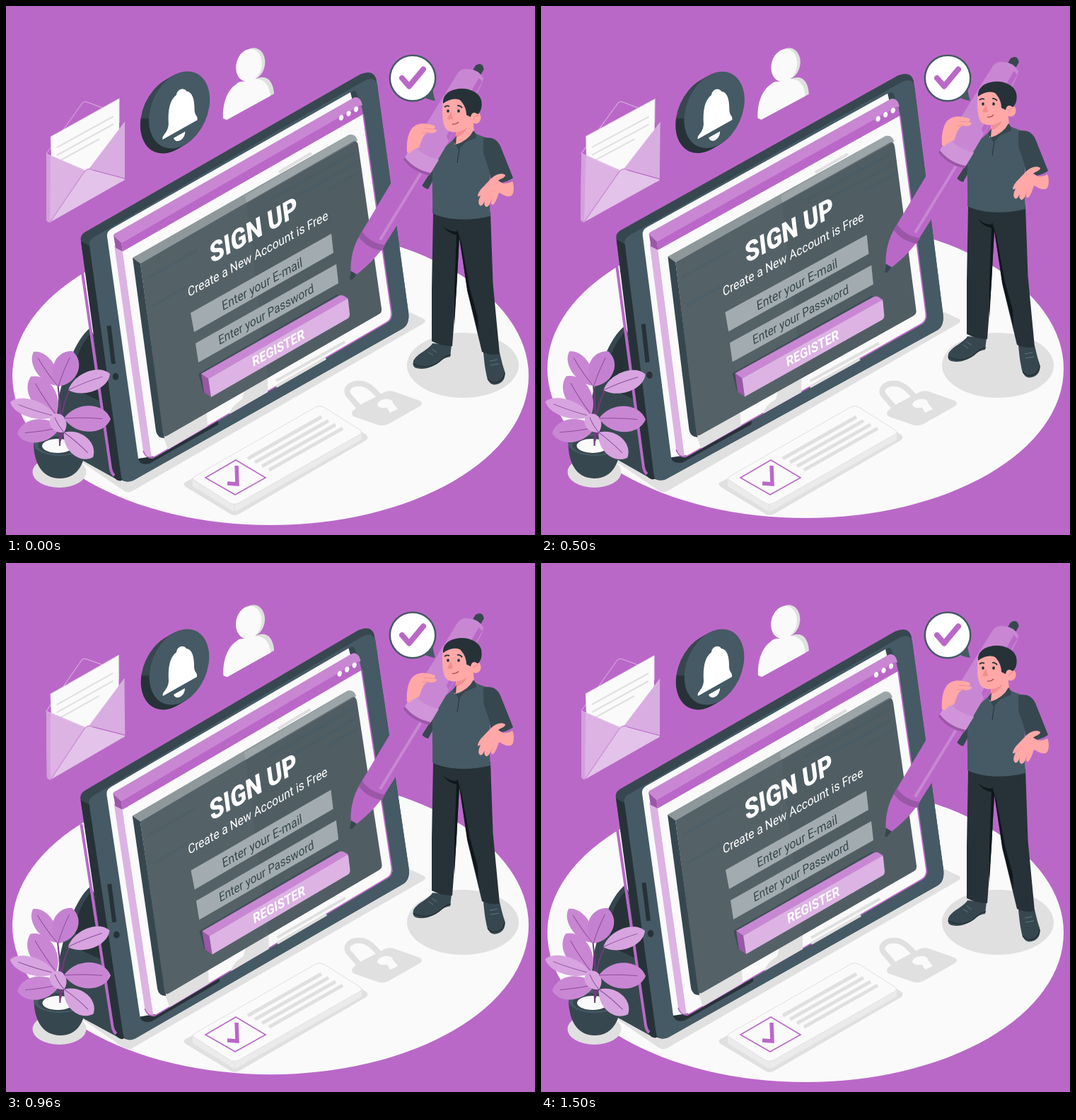
Recreate the animation shown at these times as an HTML page with a canvas. Size 748 by 748 pixels, loop 1540 ms.

```html
<!DOCTYPE html>
<html lang="en">
<head>
<meta charset="utf-8">
<title>Sign up</title>
<style>
html, body { margin: 0; width: 100%; height: 100%; overflow: hidden; background: #ba68c8; }
canvas { display: block; }
</style>
</head>
<body>
<canvas id="stage" width="748" height="748"></canvas>
<script>
const ctx = document.getElementById('stage').getContext('2d');
const LOOP = 1540, STEP = 1000 / 24, CYCLE = 36;

const C = {
  purple: '#ba68c8', deep: '#9b57a7', mid: '#c987d3', pale: '#dcb3e3',
  white: '#fafafa', gray: '#e0e0e0', slate: '#455a64', dark: '#37474f',
  ink: '#263238', skin: '#ffa8a7', blush: '#f28f8f'
};

function fill(color, d) {
  ctx.fillStyle = color;
  ctx.fill(new Path2D(d));
}

function line(color, width, d) {
  ctx.strokeStyle = color;
  ctx.lineWidth = width;
  ctx.stroke(new Path2D(d));
}

function oval(color, x, y, rx, ry, turn = 0) {
  ctx.fillStyle = color;
  ctx.beginPath();
  ctx.ellipse(x, y, rx, ry, turn, 0, Math.PI * 2);
  ctx.fill();
}

function within(setup, draw) {
  ctx.save();
  setup();
  draw();
  ctx.restore();
}

function spin(x, y, angle, draw) {
  within(() => {
    ctx.translate(x, y);
    ctx.rotate(angle);
    ctx.translate(-x, -y);
  }, draw);
}

// Text lying on the tablet's plane, centred on its baseline.
function label(text, x, y, font, color) {
  within(() => ctx.transform(0.84, -0.468, 0.134, 1, x, y), () => {
    ctx.font = font + ' Roboto, sans-serif';
    ctx.fillStyle = color;
    ctx.textAlign = 'center';
    ctx.fillText(text, 0, 0);
  });
}

function floor(lift) {
  oval(C.white, 374, 523 - lift, 365, 211);
  oval(C.gray, 646, 508, 79, 46);
  oval(C.gray, 75.5, 659, 38, 22);
  fill(C.gray, 'M100,640 L166,685 Q173,690 180,685 L590,449 Q596,445 590,442 L560,428 Z');
}

function lock() {
  line(C.gray, 8, 'M498,566 L485,551 C477,541 489,532 503,534 C516,536 523,548 532,556');
  fill(C.gray, 'M490,573 L499,565 L535,546 Q541,543 548,545 L585,558 Q591,562 585,566 L541,591 Q533,595 525,592 L493,581 Q487,578 490,573 Z');
  oval(C.white, 536, 562, 11, 6, -0.2);
  fill(C.white, 'M536,563 L546,560 L554,570 L543,575 Z');
}

function card() {
  fill(C.gray, 'M254,673 Q249,676 254,680 L317,718 Q323,722 330,718 L509,614 Q514,610 509,606 L450,570 Z');
  fill('#ebebeb', 'M264,668 L264,679 L319,713 Q323,716 328,713 L503,613 L503,602 Z');
  const top = 'M267,671 Q262,668 267,665 L438,567 Q443,564 449,567 L500,599 Q505,603 500,606 L329,703 Q323,706 317,703 Z';
  fill(C.white, top);
  line(C.gray, 1, top + ' M323,705 L323,714');
  line(C.purple, 1.6, 'M282,667 L325,642 L367,667 L324,691 Z');
  line(C.purple, 5.5, 'M313,675 L327,676 L326,650');
  for (let i = 0; i < 4; i++) {
    const x = 342 + i * 10, y = 640 + i * 5.4;
    line(C.gray, 5, `M${x},${y} L${x + 104},${y - 59}`);
  }
}

function tabletBody() {
  fill(C.dark, 'M119,455 C97,473 82,518 74,556 L68,615 L109,643 L154,668 L124,465 Z');
  fill(C.ink, 'M121,462 C108,475 101,492 95,512 L104,545 L136,560 Z');
  fill(C.dark, 'M106,333 Q104,324 112,319.5 L501,96.5 Q519,89 523.5,103 L569,433 Q571,450 561,456 L179,671 Q161,676 156,660 Z');
  fill(C.slate, 'M118,340 Q116,332 124,327 L506,106 Q521,98 525,111 L569,433 Q571,450 561,456 L180,671 Q165,677 162,663 Z');
  fill(C.ink, 'M106,333 L118,339 L163,666 Q166,673 159,671 Q152,669 150,660 Z');
  line(C.purple, 4, 'M106.5,367 L148,654 Q149,660 153,664');
  line(C.ink, 6, 'M145.5,452 L152,506');
  oval(C.ink, 155, 524, 4.3, 5);
}

function browserWindow() {
  fill(C.ink, 'M187,630 L206,640 L300,586 L300,592 L203,647 Q189,650 187,640 Z');
  fill(C.dark, 'M484,124 L492,120 Q497,121 498,131 L492,136 Z');
  fill(C.white, 'M143,326 Q142,319 149,315 L487,122 L490,134 L503,150 L546,438 L206,637 L187,640 Z');
  fill(C.pale, 'M153,338 L165,347 L206,638 Q197,636 194,629 Z');
  fill(C.white, 'M165,347 L505,153 L545,433 Q546,443 539,447 L213,636 Q206,640 205,632 Z');
  line(C.purple, 1.8, 'M194,629 Q197,639 207,639 L213,636 L539,447 Q546,443 545,433 L505,153');
  fill(C.deep, 'M152,324 L163,333 L165,347 L155,342 Z');
  fill(C.mid, 'M152,325 Q152,322 157,320 L491,130 Q497,127 502,134 L504,140 L163,335 Z');
  fill(C.purple, 'M163,335 L498,142 Q502,138 503,143 L505,153 L165,347 Z');
  for (let i = 0; i < 3; i++) oval(C.white, 474 + i * 10.5, 158 - i * 6, 3, 4, 0.3);

  fill(C.gray, 'M214,585 L229,627 L285,594 L283,560 Z');
  fill(C.gray, 'M316,577 Q318,566 334,556 L338,540 L370,520 L370,546 Z');
  line(C.gray, 4, 'M386,235 L432,208 M382,530 L479,475 M382,538 L452,498');
}

function popup() {
  fill('#8e989b', 'M179,356 L485,182 Q494,180 497,190 L190,364 Z');
  fill(C.dark, 'M179,356 L190,364 L224,611 Q214,611 212,601 Z');
  fill('#505e64', 'M190,364 L490,192 Q496,188 498,197 L531,428 Q532,433 527,436 L229,607 Q223,611 222,604 Z');
  fill('rgba(255,255,255,.025)', 'M190,364 L340,278 L370,526 L229,607 L222,604 Z');
  fill('rgba(255,255,255,.12)', 'M338,268 L485,182 Q494,180 497,190 L340,279 Z');
  line('rgba(69,90,100,.35)', 4, 'M372,275 L492,207 M400,275 L495,222 M455,260 L500,235 M200,385 L270,345 M206,425 L255,397');

  label('SIGN UP', 352, 330, '900 38px', '#fff');
  label('Create a New Account is Free', 357, 356.5, '18px', '#fff');
  fill('#a2acb0', 'M261,434 L460,322 L463,349 L266,461 Z');
  fill('#a2acb0', 'M268,477 L467,365 L470,392 L272,504 Z');
  label('Enter your E-mail', 363, 399.5, '18px', C.dark);
  label('Enter your Password', 368.5, 442, '17.5px', C.dark);
  fill('#3f4e56', 'M272,520 L468,408 L476,411 L279,546 Z');
  fill(C.deep, 'M276,520 L286,527 L290,553 L280,546 Z');
  fill(C.mid, 'M276,520 L470,410 Q474,408 478,410 L484,414 L286,527 Z');
  fill(C.pale, 'M286,527 L481,415 Q484,413 484,417 L486,436 Q486,440 483,442 L290,553 Z');
  label('REGISTER', 386, 490, 'bold 19px', '#fff');
}

function tablet() {
  tabletBody();
  browserWindow();
  popup();
}

function leaf(x, y, tipX, tipY, width, color) {
  const length = Math.hypot(tipX - x, tipY - y), w = width * 0.66;
  within(() => {
    ctx.translate(x, y);
    ctx.rotate(Math.atan2(tipY - y, tipX - x));
  }, () => {
    fill(color, `M0,0 C${length * .25},${-w} ${length * .85},${-w} ${length},0 C${length * .85},${w} ${length * .25},${w} 0,0 Z`);
    line('#8d4c9b', 1, `M0,0 Q${length * .4},-2 ${length * .82},0`);
  });
}

function plant() {
  fill(C.dark, 'M39,617 C39,645 50,668 76,668 C102,668 113,645 113,617 Z');
  oval(C.slate, 76, 619, 37, 17);
  oval(C.dark, 76, 621, 31, 13);
  oval(C.white, 73, 622, 22, 10);
  line('#6f3b7d', 2, 'M76,622 Q79,580 73,532 M76,620 Q76,565 92,540 M76,620 Q76,590 62,573 M77,610 Q80,590 86,582 M77,615 Q78,604 85,603');
  leaf(73, 537, 39, 489, 27, C.mid);
  leaf(74, 538, 94, 488, 36, '#c581d1');
  leaf(88, 543, 147, 520, 29, '#d7a4df');
  leaf(71, 578, 35, 524, 36, C.mid);
  leaf(70, 580, 6, 560, 25, '#d7a4df');
  leaf(76, 596, 16, 605, 33, C.mid);
  leaf(82, 603, 66, 577, 23, '#d7a4df');
  leaf(82, 583, 148, 584, 37, C.mid);
  leaf(82, 603, 123, 638, 31, '#d7a4df');
}

function envelope() {
  line(C.pale, 1, 'M57,209 L108,137 Q111,134 115,136 L148,148');
  fill(C.white, 'M63,185 L160,131 L160,185 L116,236 L64,214 Z');
  line(C.gray, 1, 'M63,185 L160,131 L160,165');
  line(C.gray, 2, 'M72,200 L152,156 M72,211 L152,167 M72,221 L132,188');
  fill(C.pale, 'M57,209 L63,212 L116,235 L62,306 Q57,306 57,300 Z');
  fill('#d3a0dc', 'M57,209 L63,213 L62,306 Q57,306 57,300 Z');
  fill('#d9ade1', 'M168,164 L168,243 Q168,247 164,248 L113,236 Z');
  fill('#e3c3e9', 'M62,306 L111,234 Q116,228 123,232 L168,244 Q168,246 164,248 Z');
  line(C.mid, 1.2, 'M62,306 L111,234 Q116,228 123,232');
  line(C.purple, 1.2, 'M123,232 L168,244');
  line(C.pale, 1, 'M57,209 L113,233 M168,164 L118,230');
}

function userIcon() {
  oval(C.gray, 348, 82, 18, 23, 0.25);
  oval(C.white, 343.5, 84, 18, 23.5, 0.25);
  fill(C.gray, 'M312,161 C310,140 318,120 332,113 Q341,109 350,105 C368,94 378,106 379,124 Z');
  fill(C.white, 'M307,159 C306,139 312,120 325,111 Q330,106 336,107 C356,98 372,104 374,127 L312,161 Z');
}

function bellDisc(shift, color) {
  oval(color, 245 - shift, 147 + shift * 0.58, 39, 56, 0.42);
}

function bell(scale) {
  within(() => {
    ctx.translate(238.5, 151);
    ctx.scale(scale, scale);
    ctx.translate(-238.5, -151);
  }, () => {
    const rim = ctx.createLinearGradient(0, 158, 0, 160);
    rim.addColorStop(0, C.dark);
    rim.addColorStop(1, C.ink);
    for (let i = 12; i > 0; i--) bellDisc(i, rim);
    bellDisc(0, C.slate);
    fill('#fff', 'M222,188 C220,182 229,180 230,167 C229,148 231,134 241,126 C242,118 251,115 255,121 C263,122 266,132 266,145 C266,156 271,154 270,161 Z');
    fill('#fff', 'M237,186 L253,177 C253,189 240,195 237,186 Z');
  });
}

function bubble() {
  fill(C.slate, 'M589,128 Q598,133 607,134 Q604,126 603,114 Z');
  oval(C.slate, 575, 102, 33.5, 33.5);
  oval('#fff', 575, 102, 31, 31);
  within(() => { ctx.lineCap = ctx.lineJoin = 'round'; }, () =>
    line(C.purple, 8, 'M560,102 L570,113.5 L590,89.5'));
}

// Drawn along the x axis, tip at the origin.
function pen() {
  within(() => {
    ctx.translate(487, 387);
    ctx.rotate(-Math.atan2(307, 184));
  }, () => {
    fill(C.dark, 'M0,-1 L13,-6 L14,4 L1,2 Z');
    fill(C.purple, 'M11,-6 C25,-15 43,-21 60,-21 L190,-21 L190,19 L60,16 C40,14 25,9 11,4 Z');
    line(C.mid, 4, 'M70,7 L180,8');
    fill(C.deep, 'M58,-21 Q50,-3 58,17 L67,17 Q59,-3 67,-21 Z');
    fill(C.dark, 'M336,-4 L351,-4 Q361,2 352,9 L336,9 Z');
    fill(C.mid, 'M200,-22 L328,-20 Q338,-19 341,-10 Q348,2 341,15 Q333,18 320,18 L200,19 Z');
    fill(C.purple, 'M306,10 L338,9 L336,16 L240,18 L244,12 Z');
    fill(C.deep, 'M184,-23 Q176,-2 184,20 L192,20 L192,-23 Z');
    fill('#d095d9', 'M188,-23 Q180,-2 188,20 L210,20 Q202,-2 210,-23 Z');
  });
}

function legs() {
  fill(C.dark, 'M603,477 C598,486 580,492 576,502 Q574,510 580,512 C592,515 604,511 614,502 Q620,497 628,496 L630,479 Z');
  fill(C.dark, 'M675,490 C676,500 677,511 679,520 C681,533 687,537 694,535 C703,533 707,525 705,516 Q702,508 698,490 Z');
  line(C.ink, 1.5, 'M576,506 C592,515 608,508 616,500 Q622,494 629,493 M681,527 Q688,536 699,530 Q705,525 705,518');
  line('#607580', 1, 'M597,489 L604,494 M602,485 L609,490 M684,502 L695,500 M685,508 L697,506');
  fill(C.ink, 'M604,292 L602,400 L602,474 Q616,481 631,481 L637,400 L641,326 L652,402 L673,489 Q686,495 698,492 L688.5,392 L685,292 Z');
  fill('#0f171b', 'M618,311 Q626,319 637,319 L638,316 L644,335 L656,400 L667,440 L668,462 L653,405 L641,328 L637,400 L634,452 L634,400 L637,324 Q624,321 618,311 Z');
}

function torso() {
  fill(C.dark, 'M603,222 L585,249 Q590,258 597,259 L604,246 Z');
  fill(C.slate, 'M636,186 L605,213 C601,230 604,270 603,293 C625,304 660,304 685,297 C683,270 682,240 688,215 L688,189 C680,186 670,184 662,179 Z');
  fill(C.dark, 'M675,187 C687,184 695,189 699,198 L717,243 Q704,253 685,249 C686,235 680,225 675,208 Z');
  fill(C.skin, 'M684,246 C691,238 701,235 706,239 C706,243 699,244 696,247 L703,251 Q712,251 716,248 C719,254 719,268 713,269 C705,270 701,265 697,264 Q694,274 690,280 Q686,283 686,277 L688,268 Q684,285 679,284 Q675,282 677,276 L680,269 Q674,285 670,282 Q667,279 669,273 L671,268 Q665,272 668,265 C671,258 677,254 684,246 Z');
}

function head() {
  fill(C.skin, 'M637,172 L634,196 Q650,194 662,178 L660,158 Z');
  fill(C.blush, 'M637,178 L636,186 Q648,182 652,172 Z');
  fill(C.dark, 'M637,183 L632,190 L640,203 L649,193 L665,186 Q664,178 661,176 Q654,190 636,196 Z');
  line(C.ink, 1, 'M641,201 L638,222');
  oval(C.skin, 664, 158, 7.5, 8.5);
  line(C.blush, 1.2, 'M661,160 Q663,154 668,155');
  fill(C.skin, 'M618,134 C616,148 617,162 620,170 C624,180 636,179 643,177 Q654,173 659,162 L656,135 L640,128 Z');
  fill(C.ink, 'M618,138 C617,127 625,120 635,118 C650,114 668,120 672,133 C674,143 671,150 667,153 Q659,147 657,157 L651,154 C651,145 647,138 642,133 C634,130 626,132 618,138 Z');
  oval(C.ink, 625, 148.5, 1.8, 2.2);
  oval(C.ink, 640, 148.5, 1.8, 2.2);
  line(C.ink, 1.8, 'M620,143 Q623,140 627,142 M638,141 Q642,140 645,144');
  fill(C.blush, 'M629,149 L624,159 Q627,162 632,159 Z');
  line('#a04c57', 1.3, 'M631,167 Q636,168 640,164');
}

function raisedHand() {
  fill(C.skin, 'M567,207 C566,194 568,180 574,173 C580,166 590,164 605,169 Q610,172 603,174 Q611,174 608,178 Q604,181 596,179 C589,183 588,190 584,200 Q576,202 571,208 Z');
  line(C.blush, 1, 'M603,174 L591,173 M597,179 L588,179');
}

function man() {
  legs();
  torso();
  pen();
  raisedHand();
  head();
}

// Linear interpolation through [position, value] pairs.
function track(keys, p) {
  const i = Math.max(1, keys.findIndex(k => k[0] >= p));
  const [a, from] = keys[i - 1], [b, to] = keys[i];
  return from + (to - from) * (p - a) / (b - a);
}

const LIFT = [[0, 0], [.5, 15], [1, 0]];
const SWAY = [[0, 0], [.25, 1], [.75, -1], [1, 0]];
const BEAT = [[0, .15], [.11, 1], [.32, .1], [.4, 0], [.53, 1], [.63, 0], [1, 0]];

function render(time) {
  const p = Math.min(1, Math.floor((time % LOOP + 5) / STEP) / CYCLE);
  const lift = track(LIFT, p);
  const angle = track(SWAY, p) * Math.PI / 180;

  ctx.fillStyle = C.purple;
  ctx.fillRect(0, 0, 748, 748);
  floor(lift);
  lock();
  card();
  spin(337, 384, angle, tablet);
  spin(77, 578, angle, plant);
  spin(112, 219, angle, envelope);
  spin(343, 110, angle, userIcon);
  bell(1 + 0.12 * track(BEAT, p));
  bubble();
  within(() => ctx.translate(0, -lift), man);
}

const start = performance.now();
function tick() {
  render(performance.now() - start);
  requestAnimationFrame(tick);
}
tick();
</script>
</body>
</html>
```
